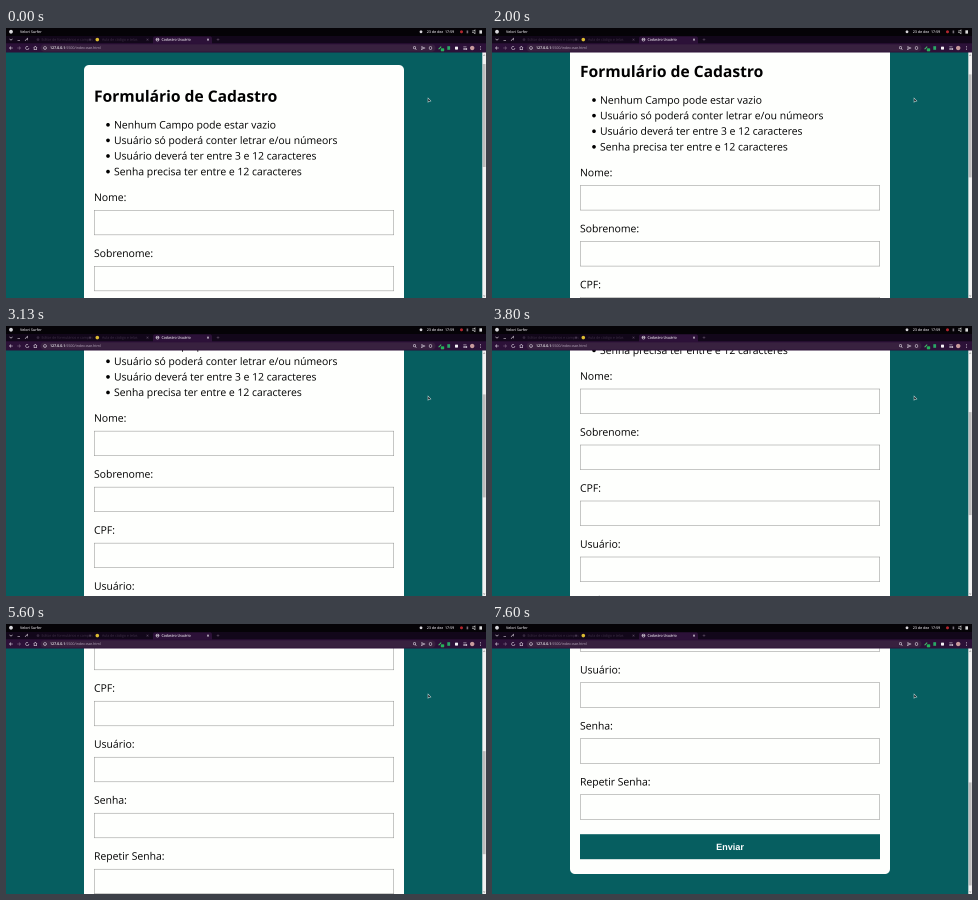
An HTML page with a canvas that plays this animation: 480 by 270 pixels, repeating every 8.14 s.

```html
<!DOCTYPE html>
<html lang="pt-BR">
<head>
<meta charset="utf-8">
<title>Cadastro Usuário</title>
<style>
html, body { margin: 0; width: 100%; height: 100%; overflow: hidden; background: #065e60; }
canvas { display: block; width: 480px; height: 270px; }
</style>
</head>
<body>
<canvas id="stage" width="480" height="270"></canvas>
<script>
const view = document.getElementById('stage').getContext('2d');
view.imageSmoothingQuality = 'high';

// Drawn enlarged and scaled down, so text can sit between pixel rows
const ZOOM = 4;
const big = document.createElement('canvas');
big.width = 480 * ZOOM;
big.height = 270 * ZOOM;
const ctx = big.getContext('2d');
ctx.scale(ZOOM, ZOOM);
ctx.textRendering = 'geometricPrecision';

const LOOP = 8140, STEP = 200 / 3, NOTCH = 13.25;
const TEAL = '#065e60', PAPER = '#fefffd';
const SANS = '"Open Sans", "Noto Sans", sans-serif';

// Wheel moves: first step, number of steps, notches scrolled
const MOVES = [
  [23, 4, 1], [28, 4, 1], [35, 6, 2], [44, 5, 2], [52, 6, 3], [60, 5, 2],
  [67, 6, 2], [75, 5, 2], [82, 5, 2], [91, 8, 4], [101, 4, 1]
];

const RULES = [
  'Nenhum Campo pode estar vazio',
  'Usuário só poderá conter letrar e/ou númeors',
  'Usuário deverá ter entre 3 e 12 caracteres',
  'Senha precisa ter entre e 12 caracteres'
];
const FIELDS = ['Nome:', 'Sobrenome:', 'CPF:', 'Usuário:', 'Senha:', 'Repetir Senha:'];

function scrollAt(step) {
  let sum = 0;
  for (const [first, count, notches] of MOVES) {
    if (step < first) break;
    let p = Math.min(1, (step - first + 1.4) / (count + 0.4));
    if (count === 6) p = Math.pow(p, 1.74);
    sum += notches * NOTCH * p * p * (3 - 2 * p);
  }
  return sum;
}

function rect(x, y, w, h, color) {
  ctx.fillStyle = color;
  ctx.fillRect(x, y, w, h);
}

function round(x, y, w, h, r, color) {
  ctx.fillStyle = color;
  ctx.beginPath();
  ctx.roundRect(x, y, w, h, r);
  ctx.fill();
}

function dot(x, y, r, color) {
  ctx.fillStyle = color;
  ctx.beginPath();
  ctx.arc(x, y, r, 0, Math.PI * 2);
  ctx.fill();
}

function text(str, x, y, font, color, align = 'left') {
  ctx.font = font;
  ctx.fillStyle = color;
  ctx.textAlign = align;
  ctx.fillText(str, x, y);
}

function line(points, color, width = 0.6) {
  ctx.strokeStyle = color;
  ctx.lineWidth = width;
  ctx.beginPath();
  points.forEach(([x, y], i) => i ? ctx.lineTo(x, y) : ctx.moveTo(x, y));
  ctx.stroke();
}

function ring(x, y, r, color, from = 0, to = Math.PI * 2) {
  ctx.strokeStyle = color;
  ctx.lineWidth = 0.6;
  ctx.beginPath();
  ctx.arc(x, y, r, from, to);
  ctx.stroke();
}

function cross(x, y, r, color) {
  line([[x - r, y - r], [x + r, y + r]], color);
  line([[x - r, y + r], [x + r, y - r]], color);
}

function drawPage(scroll) {
  rect(0, 24, 480, 246, TEAL);
  ctx.save();
  ctx.translate(0, -scroll);
  round(78, 37, 320, 504.5, 5, PAPER);
  text('Formulário de Cadastro', 88, 73.8, `bold 15.6px ${SANS}`, '#000');

  const body = `10.4px ${SANS}`;
  RULES.forEach((rule, i) => {
    const y = 100.4 + 15.6 * i;
    dot(102, y - 3.6, 1.85, '#000');
    text(rule, 108, y, body, '#000');
  });

  FIELDS.forEach((label, i) => {
    const y = 182 + 56 * i;
    text(label, 88, y - 9.1, body, '#000');
    ctx.strokeStyle = '#8f908e';
    ctx.lineWidth = 0.5;
    ctx.strokeRect(88.25, y + 0.25, 299.5, 24.6);
  });

  rect(88, 501.7, 300, 25, TEAL);
  text('Enviar', 238, 517.5, 'bold 9.1px "Liberation Sans", Arial, sans-serif', '#fff', 'center');
  ctx.restore();
}

function drawScrollbar(scroll) {
  rect(476.3, 24.5, 3.7, 245.5, '#f1f1f1');
  rect(476.8, 36 + scroll * 0.42, 2.8, 103, '#bdbdbd');
  line([[477.3, 27.8], [478.2, 26.8], [479.1, 27.8]], '#777', 0.5);
  line([[477.3, 267.4], [478.2, 268.4], [479.1, 267.4]], '#777', 0.5);
}

function drawSystemBar() {
  const font = `600 3.6px ${SANS}`;
  rect(0, 0, 480, 8, '#050307');
  dot(5, 3.7, 1.9, '#d8d8dc');
  text('Velori Surfer', 14, 4.9, font, '#d6d3d8');
  dot(415, 3.8, 1.4, '#d6d3d8');
  text('23 de dez  17:59', 434.5, 4.9, font, '#d6d3d8', 'center');
  dot(455.5, 3.8, 1.5, '#b3272f');
  rect(460.6, 2.5, 1.6, 2.8, '#77707a');
  line([[466, 3], [467.5, 3], [469, 1.9], [469, 5.6], [467.5, 4.6], [466, 4.6]], '#ddd');
  rect(473.4, 2.3, 2.6, 3.3, '#ddd');
}

function drawTabs() {
  const font = `3.5px ${SANS}`;
  rect(0, 8, 480, 7.5, '#12071a');
  line([[3.5, 10.8], [5, 12.2], [6.5, 10.8]], '#cfc5d2');
  line([[11.5, 12.3], [14, 12.3]], '#cfc5d2');
  line([[19, 12.8], [21.5, 10.3], [21.5, 12.3]], '#cfc5d2');
  dot(32, 11.6, 1.4, '#35283d');
  text('Editor de formulários e campos', 35.5, 12.7, font, '#43354b');
  cross(84, 11.6, 0.9, '#54455c');
  dot(91.3, 11.6, 1.8, '#dcbc32');
  text('Aula de código e telas', 96, 12.7, font, '#43354b');
  cross(141.5, 11.6, 0.9, '#54455c');
  round(147, 8.4, 59, 7.4, [2, 2, 0, 0], '#2c1138');
  ring(151.5, 11.6, 1.5, '#e5dfe8');
  line([[150, 11.6], [153, 11.6]], '#e5dfe8');
  text('Cadastro Usuário', 155.5, 12.7, `600 3.5px ${SANS}`, '#f2edf4');
  cross(202, 11.6, 0.9, '#e5dfe8');
  line([[210.7, 11.6], [213.3, 11.6]], '#5d4c64');
  line([[212, 10.3], [212, 12.9]], '#5d4c64');
}

function drawToolbar() {
  const pale = '#d9d0dc';
  rect(0, 15.3, 480, 9.2, '#2c1138');
  round(34.5, 16.4, 395, 7.2, 3.6, '#38213f');
  line([[5, 18.5], [3.5, 20], [5, 21.5]], pale);
  line([[3.5, 20], [6.8, 20]], pale);
  line([[13, 18.5], [14.5, 20], [13, 21.5]], '#7d6784');
  line([[11.2, 20], [14.5, 20]], '#7d6784');
  ring(21.3, 20, 1.6, pale, 0, 5.2);
  line([[27.5, 20], [29.3, 18.3], [31.1, 20]], pale);
  line([[28.1, 19.8], [28.1, 21.7], [30.5, 21.7], [30.5, 19.8]], pale);
  ring(39, 20, 1.4, pale);
  line([[39, 19.8], [39, 20.8]], pale, 0.5);

  const host = '127.0.0.1';
  text(host, 44, 21.1, `600 3.6px ${SANS}`, '#fff');
  const x = 44 + ctx.measureText(host).width;
  text(':5500/index-eae.html', x, 21.1, `3.6px ${SANS}`, '#b9aabd');

  ring(408.5, 19.7, 1.2, pale);
  line([[409.3, 20.6], [410.4, 21.7]], pale);
  line([[415.5, 18.5], [418.8, 20], [415.5, 21.5], [416.2, 20], [415.5, 18.5]], pale);
  ring(424.5, 20, 1.4, pale);
  line([[432.6, 21.2], [435.2, 18.6]], '#46c46a', 1);
  round(434.8, 20.3, 3.4, 3, 0.6, '#24b45a');
  rect(441.3, 18.2, 2.8, 3.6, '#2aa866');
  round(449, 18.6, 3, 3, 0.6, '#f4f0f5');
  rect(457.3, 18.6, 3.2, 0.6, pale);
  rect(457.3, 20, 2, 0.6, pale);
  rect(457.3, 21.4, 2, 0.6, pale);
  dot(460.3, 21, 0.9, pale);
  dot(466.2, 20, 2.2, '#c79a9c');
  for (const y of [18.5, 20, 21.5]) dot(474.5, y, 0.45, pale);
}

function drawPointer() {
  ctx.beginPath();
  ctx.moveTo(422, 70);
  ctx.lineTo(422, 74.2);
  ctx.lineTo(423.1, 73.3);
  ctx.lineTo(424.9, 73);
  ctx.closePath();
  ctx.fillStyle = '#101416';
  ctx.fill();
  ctx.strokeStyle = '#d5e2e2';
  ctx.lineWidth = 0.5;
  ctx.stroke();
}

let shown = -1;
function draw(now) {
  const step = Math.floor((now % LOOP + 5) / STEP);
  if (step === shown) return;
  shown = step;
  const scroll = scrollAt(step);
  drawPage(scroll);
  drawScrollbar(scroll);
  drawSystemBar();
  drawTabs();
  drawToolbar();
  drawPointer();
  view.drawImage(big, 0, 0, 480, 270);
}

let start;
function tick(now) {
  start ??= now;
  draw(Math.max(0, now - start));
  requestAnimationFrame(tick);
}
draw(0);
requestAnimationFrame(tick);
</script>
</body>
</html>
```
